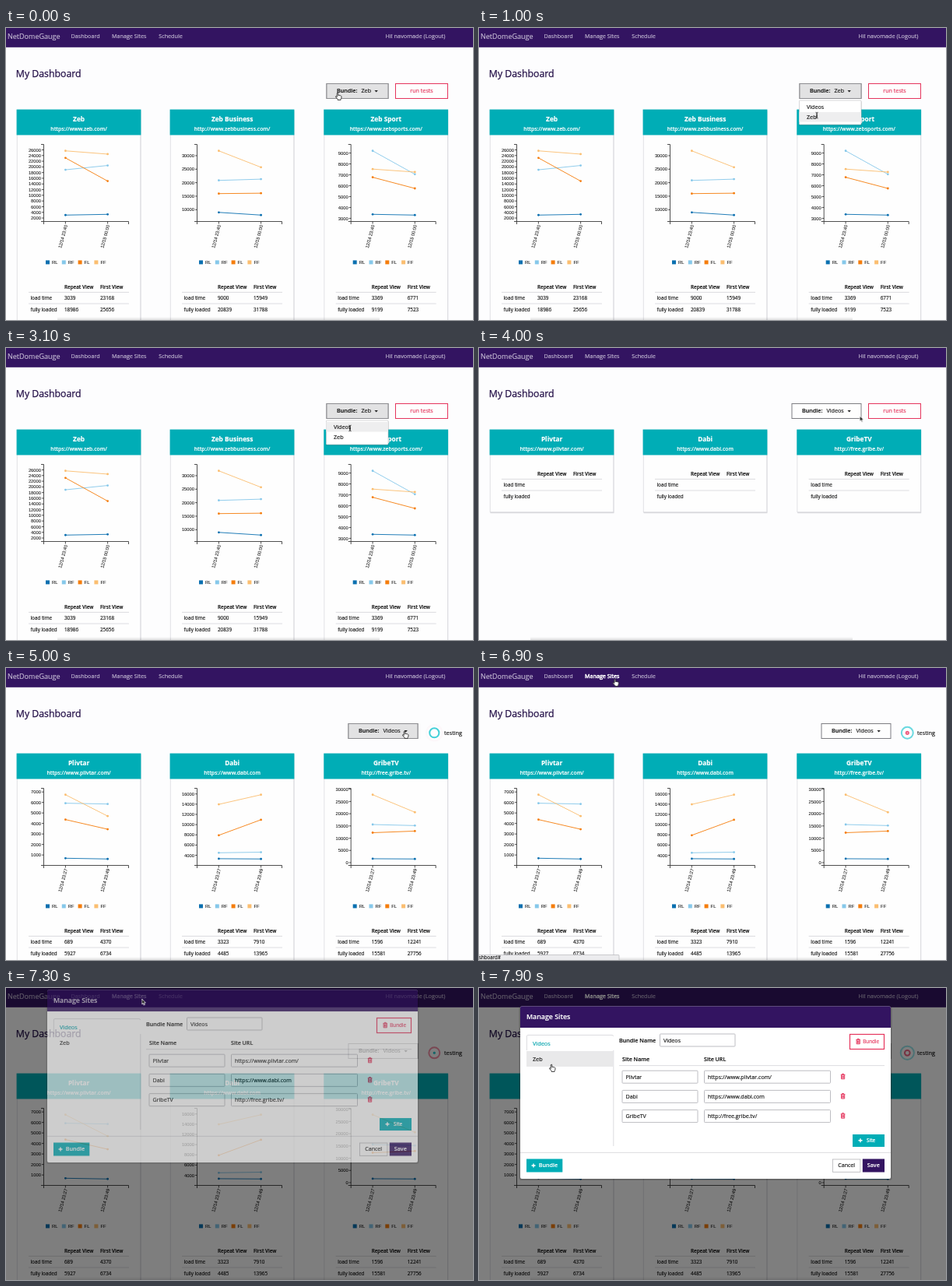
An HTML page for the animation above (8 s loop, 600 by 375 pixels).

```html
<!DOCTYPE html>
<html lang="en">
<head>
<meta charset="utf-8">
<title>Dashboard</title>
<style>
html, body { margin: 0; width: 100%; height: 100%; overflow: hidden; background: #fdfdfe; }
svg { display: block; width: 100vw; height: 100vh; }
text { font-family: "Open Sans", "Noto Sans", sans-serif; color: #151515; fill: currentColor;
  stroke: currentColor; stroke-width: .16; white-space: pre; }
.semi { font-weight: 600; }
.bold { font-weight: 700; }
.mid { text-anchor: middle; }
.end { text-anchor: end; }
.plot { font-family: "Liberation Sans", Arial, sans-serif; font-size: 5.8px; color: #111; stroke-width: .06; }
.white { color: #fff; }
.nav { color: #c3b9d3; }
.strong { stroke-width: .3; }
.title { color: #241048; stroke-width: .25; }
.teal { color: #00a3ad; }
.red { color: #e5355d; }
.axis { fill: none; stroke: #222; stroke-width: .8; }
.rule { stroke: #d4d4d8; stroke-width: .8; }
.field { fill: #fff; stroke: #bdbdc2; stroke-width: 1; }
.ring { fill: none; stroke-width: 2;
  animation: grow 888.889ms cubic-bezier(0, .2, .8, 1) infinite, fade 888.889ms cubic-bezier(.6, 0, .8, 1) infinite; }
.cyan { stroke: #14c4ce; animation-delay: -713ms; }
.pink { stroke: #ee5f80; animation-delay: -1157.4ms; }
@keyframes grow { from { r: 0; } to { r: 10.5px; } }
@keyframes fade { from { opacity: 1; } to { opacity: 0; } }

#sites { animation: drop 8s step-end infinite; }
@keyframes drop { 0% { transform: none; } 58.75%, 100% { transform: translateY(5px); } }
#videoButton { animation: slot 8s step-end infinite; }
@keyframes slot { 0% { transform: translateX(-38px); } 58.75%, 100% { transform: none; } }

#shade { animation: dim 8s linear infinite; }
@keyframes dim { 0%, 86.9% { opacity: 0; } 88.5%, 100% { opacity: .5; } }
#modal { animation: slide 8s ease-out infinite; }
@keyframes slide {
  0%, 89.5% { opacity: 0; transform: translateY(-55px); }
  93.5%, 100% { opacity: 1; transform: none; }
}
#pointer { animation: roam 8s ease-in-out infinite; }
@keyframes roam {
  0%, 5% { transform: translate(426px, 83px); }
  11% { transform: translate(434px, 112px); }
  21%, 25% { transform: translate(435px, 116px); }
  32.5%, 35% { transform: translate(440px, 83px); }
  38.5%, 43.75% { transform: translate(442px, 103px); }
  54% { transform: translate(511px, 80px); }
  61%, 75% { transform: translate(512px, 81px); }
  84%, 91.5% { transform: translate(174.5px, 14px); }
  97.5%, 100% { transform: translate(93px, 98px); }
}
</style>
</head>
<body>
<svg id="stage" viewBox="0 0 600 375"></svg>
<script>
const LOOP = 8000;
const PURPLE = '#331461', TEAL = '#00adb6', RED = '#e5355d';
const SERIES = [['RL', '#0b70b0'], ['RF', '#86c8ea'], ['FL', '#f57d0c'], ['FF', '#fbbe70']];

const rules = [];

// Group that is visible only in the given [from, to] spans (ms).
function shown(spans, body) {
  const name = 'show' + rules.length;
  const steps = spans.map(([from, to]) =>
    `${from / LOOP * 100}% { opacity: 1; }` + (to < LOOP ? `${to / LOOP * 100}% { opacity: 0; }` : ''));
  const start = spans[0][0] > 0 ? '0% { opacity: 0; }' : '';
  const last = spans[spans.length - 1][1] < LOOP ? 0 : 1;
  rules.push(`@keyframes ${name} { ${start} ${steps.join(' ')} 100% { opacity: ${last}; } }`);
  return `<g style="animation: ${name} ${LOOP}ms step-end infinite">${body}</g>`;
}

const text = (x, y, str, size, cls = '') =>
  `<text x="${x}" y="${y}" font-size="${size}" class="${cls}">${str}</text>`;
const rect = (x, y, w, h, fill, more = '') =>
  `<rect x="${x}" y="${y}" width="${w}" height="${h}" fill="${fill}" ${more}/>`;
const rule = (x1, y, x2) => `<path class="rule" d="M${x1} ${y}H${x2}"/>`;
const move = (x, y, body) => `<g transform="translate(${x} ${y})">${body}</g>`;
const caret = (x, y) => `<path d="M${x} ${y}h4.4l-2.2 2.4z" fill="#222"/>`;

// Coordinates inside a card count from its top left corner.
function chart({ step, first, second, times }) {
  const top = 44.5, base = 143.5, left = 34.5, right = 143.5, xs = [62.4, 116.6];
  const all = [...first, ...second];
  const min = Math.min(...all), max = Math.max(...all), pad = (max - min) * .1;
  const yOf = v => base - (v - min + pad) / (max - min + 2 * pad) * (base - top);
  let out = `<path class="axis" d="M${left - 3.5} ${top}H${left}V${base}H${left - 3.5}M${left} ${base + 3.5}V${base}H${right}v3.5"/>`;
  for (let v = Math.ceil((min - pad) / step) * step; v <= max + pad; v += step) {
    const y = yOf(v);
    out += `<path class="axis" d="M${left - 2.5} ${y}h2.5"/>` + text(left - 3.5, y + 2.1, v, 5.8, 'plot end');
  }
  xs.forEach((x, i) => {
    out += `<path class="axis" d="M${x} ${base}v3"/>` +
      `<g transform="translate(${x + 2.6} ${base + 5}) rotate(-75)">${text(0, 0, times[i], 5.8, 'plot end')}</g>`;
  });
  SERIES.forEach(([label, color], i) => {
    const ys = [yOf(first[i]), yOf(second[i])];
    out += `<path d="M${xs[0]} ${ys[0]}L${xs[1]} ${ys[1]}" stroke="${color}" stroke-width=".9"/>`;
    xs.forEach((x, k) => out += `<circle cx="${x}" cy="${ys[k]}" r="1.4" fill="${color}"/>`);
    const lx = 37 + i * 20.8;
    out += rect(lx, 193.4, 5, 5, color) + text(lx + 8, 198.1, label, 6, 'plot');
  });
  return out;
}

function table(y, site, filled) {
  const cells = (row, [a, b]) => filled ? text(61, row, a, 6.3) + text(107, row, b, 6.3) : '';
  const [rl, rf, fl, ff] = site.first || [];
  return text(61, y, 'Repeat View', 6.3, 'semi') + text(107, y, 'First View', 6.3, 'semi') +
    rule(15, y + 4.8, 144) + text(17.5, y + 14.6, 'load time', 6.3) + cells(y + 14.6, [rl, fl]) +
    rule(15, y + 19.4, 144) + text(17.5, y + 29, 'fully loaded', 6.3) + cells(y + 29, [rf, ff]);
}

function card(site, i, filled) {
  const height = filled ? 300 : 106;
  return move([14, 211, 408.7][i % 3], 105 + Math.floor(i / 3) * 144.5,
    rect(.5, 1.2, 159, height, '#d8d8dc') + rect(.2, .4, 158.6, height - .6, '#fefefe', 'stroke="#d8d8dc" stroke-width=".7"') +
    rect(-.4, -.4, 159.8, 32.9, TEAL) +
    text(79.6, 15.4, site.name, 8.3, 'bold white mid') + text(79.6, 26.7, site.url, 6.8, 'semi white mid') +
    (filled ? chart(site) : '') + table(filled ? 229.6 : 58.6, site, filled));
}
const cards = (sites, filled) => sites.map((s, i) => card(s, i, filled)).join('');

const night = ['12/14 23:40', '12/15 00:00'], late = ['12/14 23:27', '12/14 23:49'];
const network = [
  { name: 'Zeb', url: 'https://www.zeb.com/', step: 2000, times: night,
    first: [3039, 18986, 23168, 25656], second: [3300, 20500, 15000, 24500] },
  { name: 'Zeb Business', url: 'http://www.zebbusiness.com/', step: 5000, times: night,
    first: [9000, 20839, 15949, 31788], second: [8000, 21300, 16100, 25700] },
  { name: 'Zeb Sport', url: 'https://www.zebsports.com/', step: 1000, times: night,
    first: [3369, 9199, 6771, 7523], second: [3300, 7050, 5750, 7250] }
];
const extra = { name: 'Zeb News', url: 'http://www.zebnews.com/' };
const videos = [
  { name: 'Plivtar', url: 'https://www.plivtar.com/', step: 1000, times: late,
    first: [689, 5927, 4370, 6734], second: [620, 5850, 3450, 4700] },
  { name: 'Dabi', url: 'https://www.dabi.com', step: 2000, times: late,
    first: [3323, 4485, 7910, 13965], second: [3270, 4600, 10950, 15850] },
  { name: 'GribeTV', url: 'http://free.gribe.tv/', step: 5000, times: late,
    first: [1596, 15581, 12241, 27756], second: [1500, 15150, 12900, 20600] }
];

function bundleButton(x, width, label, hover) {
  const box = (fill, line) => rect(x + .5, 71.5, width, 19, fill, `stroke="${line}" stroke-width="1"`);
  return box('#fefefe', '#7d7d82') + shown(hover, box('#e2e2e3', '#8c8c90')) +
    text(x + 13.5, 83.4, 'Bundle:', 7.2, 'semi') + text(x + 45, 83.4, label, 7.2) +
    caret(x + width - 17, 80);
}

function menu() {
  const row = y => rect(411.5, y, 79.5, 12.6, '#eeeeef');
  return rect(411, 93.6, 81, 32, '#000', 'opacity=".12" rx="1.5"') +
    rect(411.4, 93, 79.6, 31, '#fff', 'stroke="#c9c9cc" stroke-width=".7" rx="1"') +
    shown([[400, 700], [2850, 3500]], row(95)) + shown([[700, 1100]], row(108)) +
    text(421, 104, 'Videos', 7.2) + text(421, 117.2, 'Zeb', 7.2);
}

const trash = (x, y) => `<path transform="translate(${x} ${y})" fill="#f6b9c7" stroke="${RED}" stroke-width=".9"
  d="M0 1.4h5.600M1.800 1.2V.3h2v.9M.7 1.600v5.200h4.200V1.600M2.100 2.800v2.800M3.500 2.800v2.800"/>`;
const plus = (x, y) => `<path d="M${x} ${y}h5m-2.5-2.5v5" stroke="#fff" stroke-width="1.4"/>`;

function modal() {
  const field = (x, y, w, str) =>
    `<rect class="field" x="${x}" y="${y}" width="${w}" height="16" rx=".8"/>` + text(x + 4.5, y + 10.5, str, 7.1);
  const rows = videos.map((v, i) => {
    const y = 106.2 + i * 25.2;
    return field(184, y, 97, v.name) + field(289.5, y, 162, v.url) + trash(464.8, y + 3.8);
  }).join('');
  return rect(51.5, 24, 479, 223, '#000', 'opacity=".18" rx="3"') +
    rect(53, 23.5, 476, 221.5, '#fff', 'rx="2"') +
    `<path d="M53 50.900V25.500q0-2 2-2H527q2 0 2 2V50.900z" fill="${PURPLE}"/>` +
    text(61, 40, 'Manage Sites', 8.8, 'semi white') +
    '<path d="M61.4 80V62q0-1.5 1.5-1.5H171q1.5 0 1.5 1.5M172.8 80V203" fill="none" stroke="#d4d4d8" stroke-width=".8"/>' +
    text(69, 73.6, 'Videos', 7.3, 'teal') +
    shown([[7700, LOOP]], rect(61, 81, 111.4, 20, '#e9e9ea')) + text(69, 93.8, 'Zeb', 7.2) +
    text(180, 69.8, 'Bundle Name', 7.2, 'semi') + field(232.5, 59, 96.5, 'Videos') +
    rect(476.5, 59.5, 44, 19, '#fff', `stroke="${RED}" stroke-width="1.2"`) +
    trash(484.4, 65) + text(493.2, 71, 'Bundle', 6.3, 'red') +
    text(184, 94, 'Site Name', 7.1, 'semi') + text(289, 94, 'Site URL', 7.1, 'semi') +
    rule(180, 99.6, 521) + rows +
    rect(480, 188, 41, 16, TEAL) + plus(487.5, 195.7) + text(498, 197.9, 'Site', 6.2, 'semi white') +
    rule(53, 211.4, 529) +
    rect(61, 219.5, 46.3, 17, TEAL) + plus(67.5, 228) + text(76.8, 230.4, 'Bundle', 7.1, 'semi white') +
    rect(454.5, 220, 35.4, 16.3, '#fff', 'stroke="#b4b4b8" stroke-width=".8"') + text(472.2, 230.4, 'Cancel', 7.1, 'mid') +
    rect(492.8, 219.5, 28.2, 17, PURPLE) + text(506.8, 230.4, 'Save', 7.1, 'semi white mid');
}

function pointer() {
  const outline = 'stroke-linejoin="round" stroke-width=".8"';
  const hand = `<path fill="#fff" stroke="#111" ${outline} d="M-.7 .7q.8-1.3 1.6 0v3l1-.3.9.4.9-.1.8.6q.7.2.5 1.5-.1 1.8-.9 2.6v1h-4v-1L-2.4 5.7q-.4-1.2.7-1l1 .9z"/>`;
  const arrow = `<path fill="#111" stroke="#fff" ${outline} d="M0 0v6.8l1.5-1.3 1.1 2.5 1.2-.5-1.1-2.5h2.1z"/>`;
  const beam = '<path fill="none" stroke="#222" stroke-width=".8" d="M-1.6-3.8q1.6 0 1.6 1v5.6q0 1-1.6 1M1.6-3.8q-1.6 0-1.6 1v5.6q0 1 1.6 1M-1 1h2"/>';
  return shown([[0, 550], [2500, 2900], [4200, 6050], [6600, 7000], [7700, LOOP]], hand) +
    shown([[1100, 2500], [3500, 4200], [6050, 6600], [7000, 7700]], arrow) +
    shown([[550, 1100], [2900, 3500]], beam);
}

const header = rect(0, 0, 600, 24.8, PURPLE) +
  text(2, 13.6, 'NetDomeGauge', 9, 'nav') + text(83.6, 12.9, 'Dashboard', 7.2, 'nav') +
  text(136, 12.9, 'Manage Sites', 7.2, 'nav') + text(196.3, 12.9, 'Schedule', 7.2, 'nav') +
  text(564.5, 12.9, 'Hi! navomade (Logout)', 7.3, 'nav end') +
  shown([[6650, LOOP]], text(136, 12.9, 'Manage Sites', 7.2, 'white strong'));

const tests = rect(500.5, 71.5, 67, 19, '#fefefe', `stroke="${RED}" stroke-width="1"`) +
  text(534, 83.4, 'run tests', 7.2, 'red mid');
const testing = '<circle class="ring pink" cx="550.3" cy="83.3"/><circle class="ring cyan" cx="550.3" cy="83.3"/>' +
  text(563, 85.6, 'testing', 7.3);
const status = rect(-1, 368.4, 181, 8, '#ececee', 'stroke="#b5b5b8" stroke-width=".7" rx="1"') +
  text(0, 374, 'shboard#', 6.2);
const fold = '<linearGradient id="fold" x2="0" y2="1"><stop stop-opacity="0"/><stop offset="1" stop-opacity=".12"/></linearGradient>' +
  rect(66, 371, 414, 4, 'url(#fold)');

const stage = document.getElementById('stage');
stage.innerHTML =
  rect(0, 0, 600, 375, '#fdfdfe') + header + text(12.8, 63.4, 'My Dashboard', 12.3, 'title') +
  `<g id="sites">` +
    shown([[0, 1100], [2000, 3500]], cards(network, true)) +
    shown([[1100, 2000]], cards([...network, extra], false)) +
    shown([[3500, 4200]], cards(videos, false)) +
    shown([[4200, LOOP]], cards(videos, true)) +
  '</g>' + fold +
  shown([[0, 3500]], bundleButton(411.5, 79, 'Zeb', [[0, 1100], [2500, 3500]])) +
  shown([[3500, LOOP]], `<g id="videoButton">${bundleButton(439.5, 89, 'Videos', [[4700, 6100]])}</g>`) +
  shown([[0, 4700]], tests) + shown([[4700, LOOP]], testing) +
  shown([[400, 1100], [2850, 3500]], menu()) +
  '<rect id="shade" width="600" height="375"/>' +
  `<g id="modal">${modal()}</g>` +
  shown([[6700, 7300]], status) +
  `<g id="pointer">${pointer()}</g>`;

const sheet = document.createElement('style');
sheet.textContent = rules.join('\n');
document.head.append(sheet);
</script>
</body>
</html>
```
